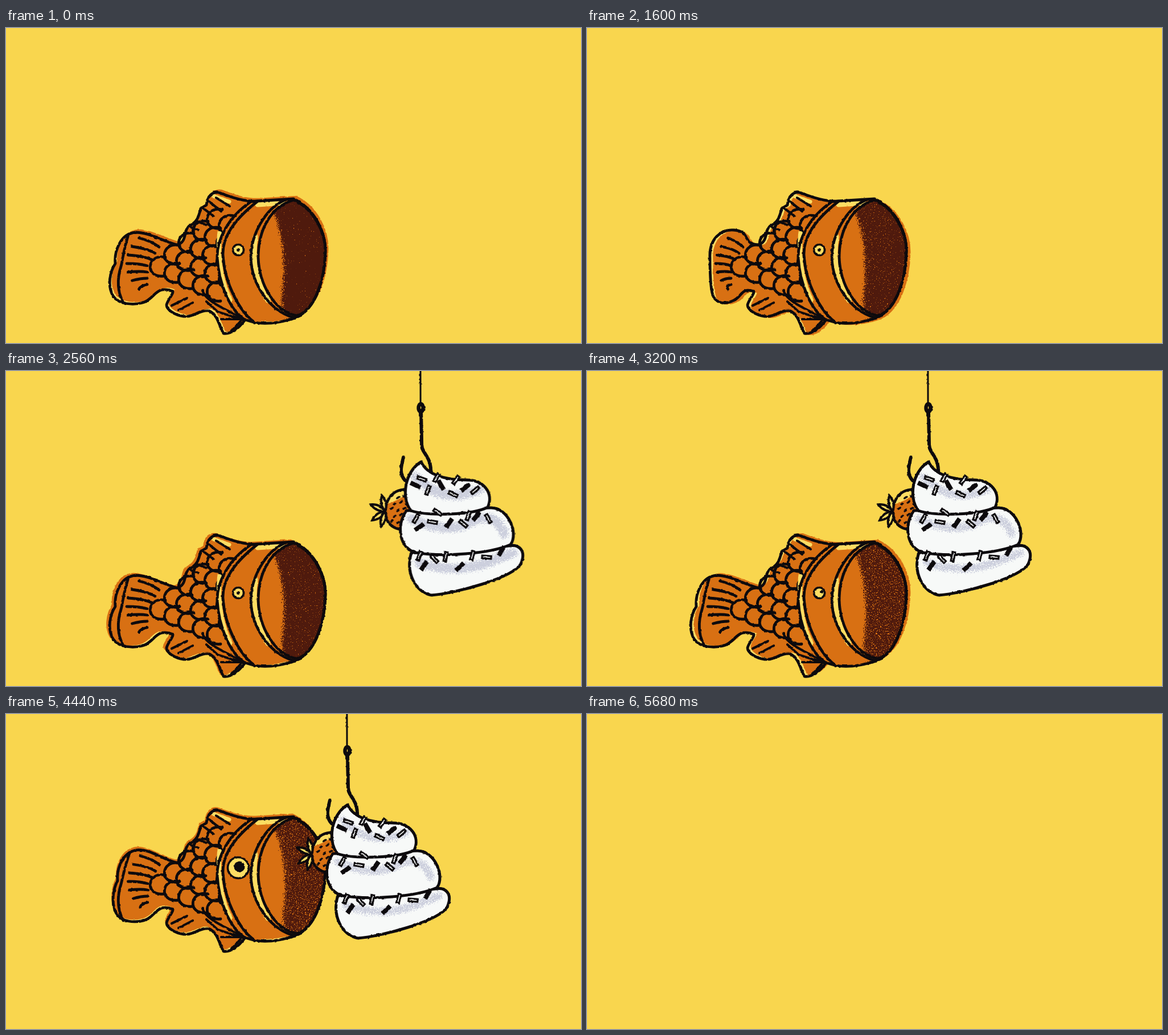
Animation, 1010 px wide and 555 px high, one loop 6720 ms. Source, as an HTML page:

```html
<!DOCTYPE html>
<html lang="en">
<head>
<meta charset="utf-8">
<title>Fish cone</title>
<style>
  html, body { margin: 0; width: 100%; height: 100%; overflow: hidden; background: #f9d64e; }
  svg { display: block; width: 100%; height: 100%; }
  .ink { fill: none; stroke: #0d0a0d; stroke-linecap: round; stroke-linejoin: round; }
  .glow { fill: none; stroke: #fcdd63; stroke-linecap: round; }
  .shade { fill: none; stroke: #cccfdd; stroke-linecap: round; filter: url(#spray); }
</style>
</head>
<body>
<svg id="stage" viewBox="0 0 1010 555"></svg>
<script>
const LOOP = 6720, FRAME = 40, EXIT = 5680;
const ORANGE = '#d87013', YELLOW = '#fcdd63', DARK = '#4f1a0d', CREAM = '#f7f9f8', BLACK = '#0d0a0d';

const mix = (a, b, p) => a + (b - a) * p;
const ease = (t, from, to) => {
  const p = Math.min(1, Math.max(0, (t - from) / (to - from)));
  return p * p * (3 - 2 * p);
};
const noise = n => { const v = Math.sin(n * 127.1 + 4.7) * 43758.5453; return v - Math.floor(v); };
const range = (n, f) => Array.from({ length: n }, (_, i) => f(i)).join('');

const ink = (d, w = 4.8) => `<path class="ink" d="${d}" stroke-width="${w}"/>`;
const glow = (d, w = 8) => `<path class="glow" d="${d}" stroke-width="${w}"/>`;
const fill = (d, color) => `<path d="${d}" fill="${color}"/>`;
const shade = (d, w) => `<path class="shade" d="${d}" stroke-width="${w}"/>`;
const group = (transform, body, extra = '') => `<g transform="${transform}" ${extra}>${body}</g>`;
const curve = p => `M${p[0]} ${p[1]}C${p.slice(2).join(' ')}`;
const ROUGH = 'filter="url(#rough)"';

const BODY = 'M300 382C318 378 312 358 320 350C336 342 338 334 342 318L352 312C354 296 362 288 374 290' +
  'C400 300 420 306 440 305L505 301C542 318 562 360 561 395C560 440 545 495 508 511C480 520 455 522 437 519' +
  'L420 514C408 530 396 540 382 538C374 524 372 505 356 498C340 496 330 510 312 508C296 506 282 496 282 488' +
  'C284 478 294 470 293 464';
const MOUTH = 'M505 303C540 318 562 360 561 395C560 440 545 495 512 507C470 500 445 450 443 405C443 355 465 315 505 303Z';
const BAND_EDGE = 'M430 306C388 335 370 375 371 405C374 450 392 495 418 513';
const TAIL_OPEN = [300, 382, 275, 375, 250, 360, 228, 360, 200, 362, 190, 395, 192, 415,
  182, 430, 178, 455, 188, 472, 198, 488, 225, 488, 240, 484, 262, 478, 262, 452, 293, 464];
const TAIL_SHUT = [300, 382, 272, 380, 288, 358, 258, 356, 235, 354, 214, 372, 216, 405,
  216, 425, 216, 445, 219, 462, 222, 486, 240, 486, 250, 483, 275, 476, 268, 456, 293, 464];

const defs = (seed, grain) => `<defs>
  <filter id="rough" color-interpolation-filters="sRGB">
    <feTurbulence type="fractalNoise" baseFrequency=".2" seed="3"/>
    <feDisplacementMap in="SourceGraphic" scale="3" xChannelSelector="R" yChannelSelector="G"/>
  </filter>
  <filter id="spray" x="-50%" y="-100%" width="200%" height="300%" color-interpolation-filters="sRGB">
    <feGaussianBlur in="SourceGraphic" stdDeviation="5" result="soft"/>
    <feTurbulence type="fractalNoise" baseFrequency=".6" seed="${seed}" result="grain"/>
    <feComposite in="soft" in2="grain" operator="arithmetic" k2=".6" k3="1" k4="${-grain}"/>
    <feComponentTransfer result="dots"><feFuncA type="linear" slope="14"/></feComponentTransfer>
    <feComponentTransfer in="soft" result="paint"><feFuncA type="linear" slope="60"/></feComponentTransfer>
    <feComposite in="paint" in2="dots" operator="in"/>
  </filter>
  <clipPath id="mouth"><path d="${MOUTH}"/></clipPath>
</defs>`;

// Overlapping rows of arcs that widen from the tail to the head.
const scales = () => range(6, c => {
  const count = Math.min(c + 1, 9 - c);
  return range(count, i => {
    const off = i - (count - 1) / 2, x = 253 + 23 * c + Math.abs(off) * 4, y = 420 - 5 * c + off * 32;
    return ink(`M${x + 27} ${y - 16}C${x - 6} ${y - 23} ${x - 10} ${y + 21} ${x + 24} ${y + 17}`);
  });
});

const eye = (x, y, rx, ry, px, py, dx, dy) =>
  `<ellipse cx="${x}" cy="${y}" rx="${rx}" ry="${ry}" fill="${YELLOW}" stroke="${BLACK}" stroke-width="3.6"/>
   <ellipse cx="${x + dx}" cy="${y + dy}" rx="${px}" ry="${py}" fill="${BLACK}"/>`;

// The orange print sits loosely under the outlines.
const print = (d, [x, y]) => fill(d, YELLOW) +
  group(`translate(${x} ${y})`, `<path d="${d}" fill="${ORANGE}" stroke="${ORANGE}" stroke-width="2"/>`);

function swimmingFish(t, slip) {
  const held = Math.floor(t / 80) * 80;
  const shut = Math.min(1, .58 * (1 - Math.cos(held / 640 * 2 * Math.PI)));
  const tail = curve(TAIL_OPEN.map((v, i) => mix(v, TAIL_SHUT[i], shut)));
  const rays = range(7, i => ink(`M${212 + 2.4 * (i - 3) ** 2 + 14 * shut} ${370 + 15 * i}` +
    `Q${236 + Math.max(0, 3 - i) * 7 + 7 * shut} ${376 + 13 * i} ${248 + Math.max(0, 3 - i) * 7 + 5 * shut} ${386 + 11 * i}`));
  const fold = shut < .6 ? ink(`M${215 + 14 * shut} 364C${205 + 8 * shut} 395 206 405 202 420C194 445 196 465 206 484`) : '';
  const wide = ease(t, 3200, 3700), look = ease(t, 2600, 2900);
  return print(tail + BODY, slip) + scales() +
    fill(BAND_EDGE + 'L437 519L508 511L505 301Z', ORANGE) +
    fill(MOUTH, ORANGE) +
    `<g clip-path="url(#mouth)"><path d="M462 310C490 360 490 440 482 478L490 520H580V280H480Z" fill="${DARK}" filter="url(#spray)"/></g>` +
    glow('M375 362C371 415 380 450 394 480') + glow('M438 368C432 410 440 450 460 480', 9) +
    glow('M442 311L486 308', 9) + glow('M364 296L392 306', 7) +
    fold + rays + ink(tail) + ink(BODY) + ink(MOUTH) + ink(BAND_EDGE) +
    ink('M441 306C398 340 380 370 381 400C384 450 410 500 437 519') +
    ink('M490 303C455 318 430 365 430 405C432 455 465 500 508 511') +
    ink('M322 350L338 356M334 340L352 347M347 318L364 331M357 306L378 323M369 299L393 314', 4.2) +
    ink('M345 462C350 482 385 495 418 513M352 482L372 500L415 514M378 513L410 513M396 534L412 517', 4.2) +
    ink('M291 489L318 476M303 497L328 484', 4.2) +
    eye(408, 391, 9.5 + 9 * wide, 9.5 + 9 * wide, 3 + 6.5 * wide, 3 + 6.5 * wide, look * (4 - 2 * wide), -2 * look);
}

function coneFish(slip) {
  const rim = 'M464 160C470 205 515 241 560 241C610 241 655 210 668 152C678 180 684 215 680 245L678 266';
  const body = rim +
    'C690 276 702 290 700 305C696 325 680 334 655 352C662 362 660 370 666 378C676 400 678 432 660 443' +
    'C648 446 645 428 622 442C625 470 655 495 656 515C655 545 625 557 592 557C565 557 532 548 531 522' +
    'C530 490 548 455 551 432C535 412 512 405 497 380C480 374 460 364 456 346C456 320 468 300 467 262Z';
  return print(body, slip) +
    group('translate(132 759) rotate(-90) scale(1.1)', scales()) +
    fill(rim + 'C660 305 610 335 560 335C520 335 485 315 468 280Z', ORANGE) +
    glow('M468 190C490 230 525 250 565 250C615 249 655 215 674 170', 11) +
    glow('M470 270C490 315 525 329 560 329C610 328 660 295 679 252', 8) + ink(body, 5) +
    ink('M466 193C480 232 525 258 565 258C612 257 660 220 678 182') +
    ink('M467 255C480 300 520 322 560 323C610 322 660 290 681 235') +
    ink('M468 280C485 315 520 335 560 335C610 335 660 305 678 266') +
    ink('M482 305L468 346M495 332L478 364M507 344L492 375M515 362L504 388M524 376L516 398', 4.2) +
    ink('M677 272L640 352M678 274L657 343M680 276L676 333M684 280L690 318', 4.2) +
    ink('M650 385L660 412M640 392L650 424', 4.2) +
    ink('M537 530C560 550 640 548 655 530') +
    range(7, i => ink(`M${567 + 9 * i} ${490 - 5 * Math.sin(i)}Q${553 + 13 * i} 508 ${551 + 14 * i} 537`, 4.2)) +
    eye(553, 285, 9.5, 13.5, 4, 7, 0, 0);
}

const SPRINKLES = [
  [601, 190, 20], [590, 201, 25], [612, 210, -70], [627, 188, -60], [635, 201, 60], [656, 217, 25], [661, 192, -55],
  [678, 205, -40], [695, 210, -40], [591, 260, -60], [597, 275, -35], [620, 266, 10], [629, 249, 35], [649, 268, -55],
  [674, 269, 40], [683, 255, -70], [697, 256, -50], [718, 260, 60], [597, 326, -70], [605, 343, -55], [623, 331, 45],
  [643, 327, -80], [668, 345, -45], [690, 325, -75], [715, 328, 5], [741, 317, -60]];

function strawberry(slip) {
  const berry = 'M576 209C545 206 531 238 540 262C545 274 558 280 570 279L590 245Z';
  const leaf = angle => group(`translate(537 247) rotate(${angle})`,
    `<path d="M0 0Q14 -8 28 0Q14 8 0 0Z" fill="${YELLOW}" stroke="${BLACK}" stroke-width="4"/>`);
  return fill(berry, YELLOW) +
    fill(`M539 ${238 + slip[1]}Q560 ${232 + slip[1]} 580 ${216 + slip[1]}L590 245L570 279C555 280 535 268 539 238Z`, ORANGE) +
    range(14, i => ink(`M${547 + i % 3 * 11 + (i / 3 | 0) % 2 * 5} ${221 + (i / 3 | 0) * 11 + i % 2 * 3}l3 -2`, 3.4)) +
    ink(berry) + [205, 258, 145, 105].map(leaf).join('');
}

function cream(slip, seated) {
  const base = seated
    ? 'M583 320C572 370 620 440 690 440C770 440 800 380 796 320C790 305 775 300 757 306Z'
    : 'M583 320C572 355 590 390 618 395C660 392 760 365 775 340C786 315 770 305 755 308Z';
  const middle = 'M574 246C555 275 563 312 590 320C640 328 720 322 757 306C772 285 752 240 722 241Z';
  const top = 'M600 160C570 178 565 225 582 246C610 256 690 254 717 240C728 215 710 192 680 192C640 192 610 182 600 160Z';
  const layer = (d, shadow) => fill(d, CREAM) + shadow + ink(d, 5);
  return strawberry(slip) +
    layer(base, shade('M596 338Q660 358 715 338L762 320', 20) + (seated ? shade('M716 378Q750 372 772 335', 18) : '')) +
    layer(middle, shade('M582 260Q650 292 695 262Q735 250 746 288', 20)) +
    layer(top, shade('M590 186Q640 238 704 208', 20)) +
    SPRINKLES.map(([x, y, a], i) => group(`translate(${x} ${y}) rotate(${a})`,
      `<rect x="-8" y="-2.4" width="16" height="4.8" fill="${i % 3 === 1 ? BLACK : CREAM}" stroke="${BLACK}" stroke-width="3.2"/>`)).join('');
}

const hook = () => ink('M598 -500L599 56', 3) +
  `<ellipse class="ink" cx="599.5" cy="65" rx="4" ry="7" stroke-width="6.5"/>` +
  ink('M600 75L601 130C601 146 619 150 617 182', 6) + ink('M569 152C566 165 560 180 572 193', 6);

function scene(t) {
  if (t >= EXIT) return '';
  const beat = Math.floor(t / 120);
  const slip = [noise(beat) * 14 - 7, noise(beat + 99) * 11 - 5];

  const arrive = 523 * (1 - Math.sin(Math.min(1, Math.max(0, (t - 1800) / 1400)) * Math.PI / 2));
  const rise = 120 * ease(t, 3240, 4240);
  const bite = ease(t, 4460, 4600);
  const turn = ease(t, 4600, 5040);
  const seated = turn > .5;
  const u = Math.max(t, 4960) - 5200;
  const pull = -(.9 * u + .0006 * u * u);

  const eyeX = mix(408 + 30 * bite, 553, turn), eyeY = mix(391 - rise, 285 + pull, turn);
  const x = mix(663 + arrive + 16 * bite, 567, turn), y = mix(285, 105 + pull, turn), tilt = 27 * turn;
  const a = tilt * Math.PI / 180;
  const tipX = x - 63 * Math.cos(a) + 125 * Math.sin(a), tipY = y - 63 * Math.sin(a) - 125 * Math.cos(a);

  const fish = seated
    ? group(`translate(${eyeX} ${eyeY}) rotate(${88 * (1 - turn)}) translate(-553 -285)`, coneFish(slip), ROUGH)
    : group(`translate(${eyeX} ${eyeY}) rotate(${-88 * turn}) translate(-408 -391)`, swimmingFish(t, slip), ROUGH);
  const bait = t < 1800 ? '' : group(`translate(${tipX - 600} ${tipY - 160})`, hook(), ROUGH) +
    group(`translate(${x} ${y}) rotate(${tilt}) translate(-663 -285)`, cream(slip, seated), ROUGH);
  return defs(beat % 9, .82 + .14 * noise(beat + 7)) + (seated ? bait + fish : fish + bait);
}

const stage = document.getElementById('stage');
let shown = -1;
function tick() {
  const t = Math.floor(performance.now() % LOOP / FRAME) * FRAME;
  if (t !== shown) stage.innerHTML = scene(shown = t);
  requestAnimationFrame(tick);
}
tick();
</script>
</body>
</html>
```
